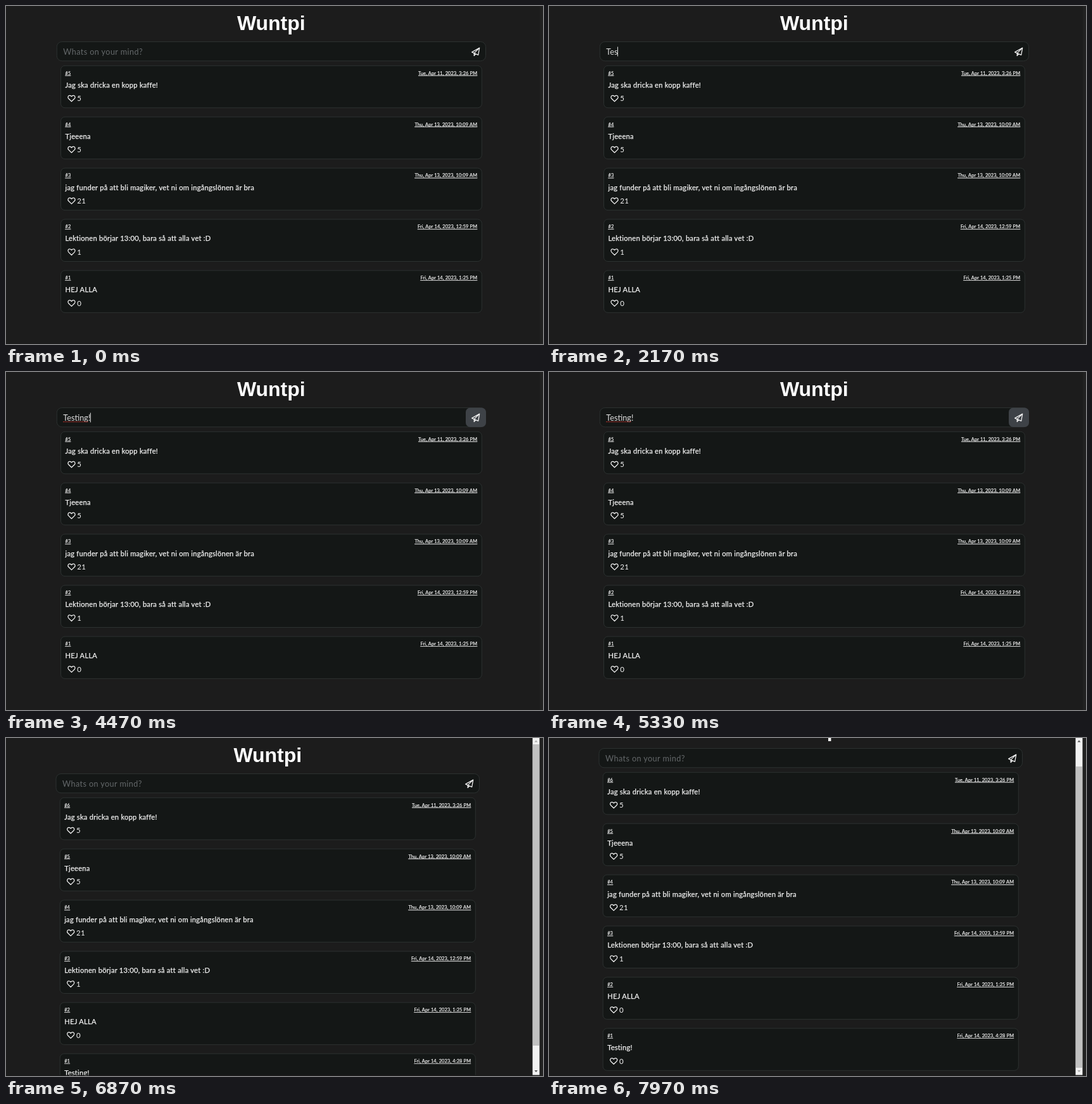
Animation of 848x534 px, one loop 8 s. Source, as an HTML page:

```html
<!DOCTYPE html>
<html lang="en">
<head>
<meta charset="utf-8">
<title>Message board</title>
<style>
  html, body { margin: 0; width: 100%; height: 100%; overflow: hidden; background: #1c1c1c; }
  svg { display: block; width: 848px; height: 534px; }
  text { font-family: Lato, "Open Sans", sans-serif; fill: #f4f4f4; letter-spacing: .02em; white-space: pre; }
  .title { font: bold 32px "Liberation Sans", Arial, sans-serif; letter-spacing: 0; fill: #fff; text-anchor: middle; }
  .field { font-size: 12.7px; letter-spacing: 0; fill: #dedede; }
  .hint { letter-spacing: .03em; fill: #64686a; }
  .message { font-size: 11.2px; stroke: #f4f4f4; stroke-width: .25; }
  .count { font-size: 11.5px; }
  .meta { font-size: 7.4px; stroke: #f4f4f4; stroke-width: .2; text-decoration: underline; }
  .end { text-anchor: end; }
  .box { fill: #141716; stroke: #2c3130; }
  .icon { fill: none; stroke: #f4f4f4; stroke-width: 1.25; stroke-linejoin: round; }
</style>
</head>
<body>
<svg id="stage" viewBox="0 0 848 534"></svg>
<script>
const LOOP = 8000;
const WORD = 'Testing!';
const KEY_TIMES = [1480, 1790, 2060, 2350, 2620, 2830, 3060, 3370];
const FOCUS = 400, HOVER = 4290, SPELLCHECK = 4380, BLUR = 5450;
const POSTED = 5865, CLEARED = 6020, LEAVE = 6330;
const SCROLL_START = 7100, SCROLL_TIME = 260, SCROLL_RANGE = 40;

const posts = [
  ['Jag ska dricka en kopp kaffe!', 'Tue, Apr 11, 2023, 3:26 PM', 5],
  ['Tjeeena', 'Thu, Apr 13, 2023, 10:09 AM', 5],
  ['jag funder på att bli magiker, vet ni om ingångslönen är bra', 'Thu, Apr 13, 2023, 10:09 AM', 21],
  ['Lektionen börjar 13:00, bara så att alla vet :D', 'Fri, Apr 14, 2023, 12:59 PM', 1],
  ['HEJ ALLA', 'Fri, Apr 14, 2023, 1:25 PM', 0],
  [WORD, 'Fri, Apr 14, 2023, 4:28 PM', 0]
];

const HEART = 'M0 4.8L-4.7 .2C-6.6-1.9-5.2-4.9-2.7-4.7C-1.4-4.6-.5-3.8 0-3C.5-3.8 1.4-4.6 2.7-4.7C5.2-4.9 6.6-1.9 4.7 .2Z';
const PLANE = 'M6.2-6.2L-5.8 .6L-2.3 2.3L4.2 5Z M6.2-6.2L-2.3 2.3V6.2L.3 3.5';

const stage = document.getElementById('stage');
const clamp = v => Math.max(0, Math.min(1, v));
const ramp = (t, start, length) => clamp((t - start) / length);
const label = (x, y, kind, content) => `<text x="${x}" y="${y}" class="${kind}">${content}</text>`;
const icon = (x, y, path) => `<path class="icon" transform="translate(${x} ${y})" d="${path}"/>`;
const box = (left, right, y, height, radius) =>
  `<rect class="box" x="${left}" y="${y}" width="${right - left}" height="${height}" rx="${radius}"/>`;

function stateAt(t) {
  const typed = t < CLEARED ? KEY_TIMES.filter(k => k <= t).length : 0;
  const lastKey = typed ? KEY_TIMES[typed - 1] : FOCUS;
  const focused = t >= FOCUS && t < BLUR;
  return {
    typed,
    posted: t >= POSTED,
    caret: focused && (t - lastKey) % 1060 < 530,
    spell: t >= SPELLCHECK && t < CLEARED,
    hover: ramp(t, HOVER, 150) - ramp(t, LEAVE, 150),
    scroll: SCROLL_RANGE * (1 - (1 - ramp(t, SCROLL_START, SCROLL_TIME)) ** 2)
  };
}

function card([message, date, likes], index, total, left, right) {
  const y = 94.3 + index * 80.9;
  return box(left + 6.2, right - 6.2, y, 66.5, 6.5)
    + label(left + 13.2, y + 14.3, 'meta', '#' + (total - index))
    + label(right - 13.3, y + 14.3, 'meta end', date)
    + label(left + 13.2, y + 34.4, 'message', message)
    + icon(left + 23.2, y + 51.7, HEART)
    + label(left + 32, y + 55.8, 'count', likes);
}

function scrollbar(scroll) {
  const arrow = (y, dir, active) =>
    `<path d="M834.5 ${y + 1.5 * dir}h5l-2.5 ${-3 * dir}z" fill="${active ? '#505050' : '#a8a8a8'}"/>`;
  return `<rect x="831.5" width="11" height="532.5" fill="#f1f1f1"/>
    <rect x="832" y="${10 + scroll * .875}" width="10" height="476" fill="#c1c1c1"/>`
    + arrow(5, 1, scroll > 0) + arrow(526.5, -1, scroll < SCROLL_RANGE);
}

function render({ typed, posted, caret, spell, hover, scroll }) {
  const left = posted ? 79 : 80.3, right = posted ? 747.5 : 757.5;
  const visible = posted ? posts : posts.slice(0, -1);
  const textX = left + 10;
  stage.innerHTML = `<g transform="translate(0 ${-scroll})">`
    + label(posted ? 413.3 : 418.8, 38.3, 'title', 'Wuntpi')
    + box(left, right, 56.5, 30.3, 8)
    + `<rect x="${right - 31.5}" y="56.5" width="32" height="30.5" rx="7" fill="#3e4247" opacity="${hover}"/>`
    + label(textX, 76.7, typed ? 'field' : 'field hint', typed ? WORD.slice(0, typed) : 'Whats on your mind?')
    + '<g id="marks"></g>'
    + icon(right - 16, 72.3, PLANE)
    + visible.map((post, i) => card(post, i, visible.length, left, right)).join('')
    + '</g><rect y="532.5" width="848" height="2" fill="#1c1c1c"/>'
    + '<rect x="843" width="5" height="534" fill="#212121"/>'
    + (posted ? scrollbar(scroll) : '');

  const field = stage.querySelector('.field');
  let marks = '';
  if (spell) {
    const end = textX + field.getSubStringLength(0, WORD.length - 1);
    marks += `<path d="M${textX} 78.7H${end}" stroke="#c2342c" stroke-width="1.2" stroke-dasharray="1.5 1"/>`;
  }
  if (caret) {
    const x = textX + (typed ? field.getComputedTextLength() : 0);
    marks += `<rect x="${x - .5}" y="64.5" width="1" height="15" fill="#e4e4e4"/>`;
  }
  stage.querySelector('#marks').innerHTML = marks;
}

let shown = '';
function tick() {
  const state = stateAt(performance.now() % LOOP);
  const key = JSON.stringify(state);
  if (key !== shown) {
    shown = key;
    render(state);
  }
  requestAnimationFrame(tick);
}
tick();
</script>
</body>
</html>
```
